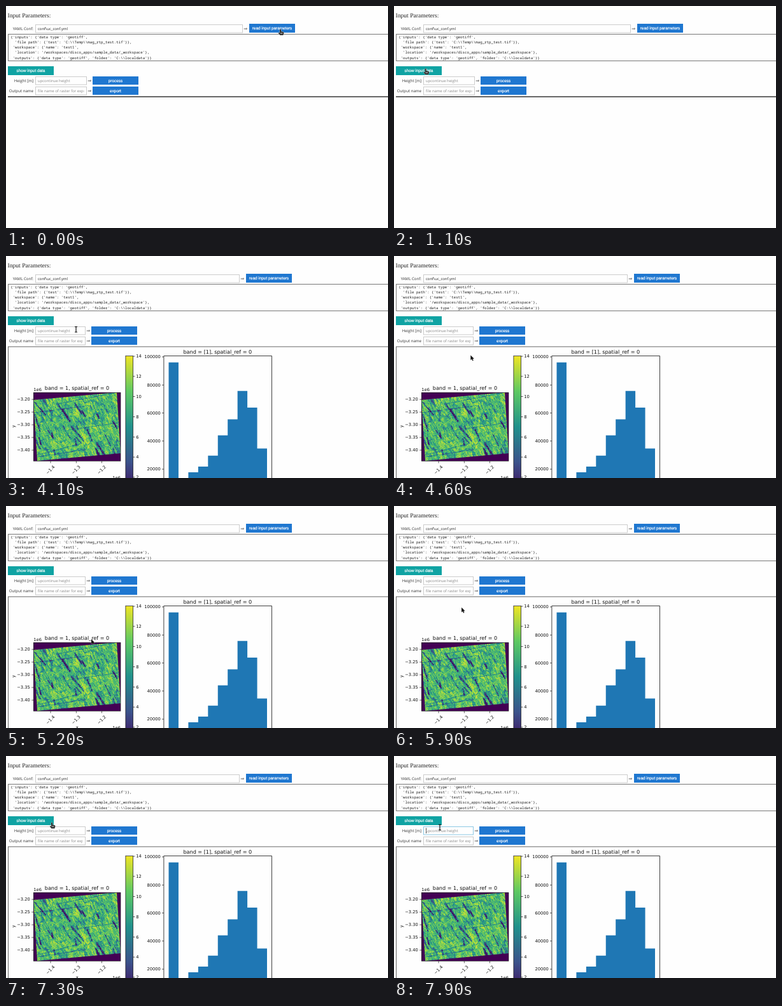
An HTML page with a canvas for the animation above (8000 ms loop, 600 by 350 pixels).

```html
<!DOCTYPE html>
<html lang="en">
<head>
<meta charset="utf-8">
<title>Input Parameters</title>
<style>
  html, body { margin: 0; width: 100%; height: 100%; overflow: hidden; background: #fefefe; }
  canvas { display: block; }
</style>
</head>
<body>
<canvas id="stage" width="600" height="350"></canvas>
<script>
const ctx = document.getElementById('stage').getContext('2d');
ctx.textRendering = 'geometricPrecision';

const LOOP = 8000, PLOT_AT = 3500, FOCUS_AT = 7500;
const BLUE = '#1f77d0', TEAL = '#10a3a3', INK = '#111';
const UI = '"Open Sans", sans-serif';
const PLOT = '"DejaVu Sans", sans-serif';
const TICK = 6.73, TITLE = 8.08;
const VIRIDIS = ['#440154', '#3b528b', '#21918c', '#5ec962', '#f0e524'];

const CONFIG = String.raw`{'inputs': {'data type': 'geotiff',
  'file path': {'test': 'C:\\Temp\\mag_rtp_test.tif'}},
 'workspace': {'name': 'test1',
  'location': '/workspaces/disco_apps/sample_data/_workspace'},
 'outputs': {'data type': 'geotiff', 'folder': 'C:\\localdata'}}`.split('\n');

// Stops of the pointer's hot spot
const POINTER = [
  { at: 0, x: 431, y: 37 },
  { at: 900, x: 50, y: 99 },
  { at: 2400, x: 45, y: 101 },
  { at: 2700, x: 162, y: 107 },
  { at: 3300, x: 189, y: 122 },
  { at: 4100, x: 110, y: 116 },
  { at: 5200, x: 134, y: 210 },
  { at: 6700, x: 72, y: 99 },
  { at: LOOP, x: 72, y: 113 }
];

const mix = (a, b, k) => a + (b - a) * k;
const clamp = (v, lo, hi) => Math.min(hi, Math.max(lo, v));
const ease = p => p * p * (3 - 2 * p);

function viridis(v) {
  const p = clamp(v, 0, 1) * 4, i = Math.min(3, Math.floor(p));
  const channel = (color, n) => parseInt(color.substr(1 + n * 2, 2), 16);
  return `rgb(${[0, 1, 2].map(n =>
    Math.round(mix(channel(VIRIDIS[i], n), channel(VIRIDIS[i + 1], n), p - i)))})`;
}

function rect(x, y, w, h, color) {
  ctx.fillStyle = color;
  ctx.fillRect(x, y, w, h);
}

function frame(x, y, w, h, color, width = 1) {
  ctx.strokeStyle = color;
  ctx.lineWidth = width;
  ctx.strokeRect(x, y, w, h);
}

function text(str, x, y, size, family, color = INK, align = 'left') {
  ctx.font = `${size}px ${family}`;
  ctx.fillStyle = color;
  ctx.textAlign = align;
  ctx.fillText(str, x, y);
}

const plotText = (str, x, y, align, size = TICK) => text(str, x, y, size, PLOT, INK, align);

function turnedText(str, x, y, angle) {
  ctx.save();
  ctx.translate(x, y);
  ctx.rotate(angle);
  plotText(str, 0, 2.4, 'center');
  ctx.restore();
}

// Evenly spaced axis ticks
function ticks(count, drawTick) {
  for (let i = 0; i < count; i++) drawTick(i);
}

// Seeded noise for the raster
function hash(x, y) {
  const s = Math.sin(x * 127.1 + y * 311.7) * 43758.5453;
  return s - Math.floor(s);
}

function noise(x, y) {
  const i = Math.floor(x), j = Math.floor(y), u = ease(x - i), v = ease(y - j);
  return mix(mix(hash(i, j), hash(i + 1, j), u), mix(hash(i, j + 1), hash(i + 1, j + 1), u), v);
}

function distanceTo(line, x, y) {
  const dx = x - line.x, dy = y - line.y;
  const c = Math.cos(line.angle), s = Math.sin(line.angle);
  const beyond = Math.max(0, Math.abs(dx * c + dy * s) - line.half);
  return Math.hypot(beyond, dy * c - dx * s);
}

// Steep dark faults, denser to the west, crossed by a few long shallow dykes
const FAULTS = Array.from({ length: 34 }, (_, i) => {
  const r = n => hash(i + 3, n * 7 + 1), dyke = i % 7 === 0;
  return {
    x: 137 * r(1) ** 1.4, y: 108 * r(2),
    angle: dyke ? -.12 - .15 * r(3) : .85 + .5 * r(3),
    half: dyke ? 60 : 3 + 11 * r(4),
    width: dyke ? .6 : .7 + 1.2 * r(5),
    depth: dyke ? .3 : .3 + .5 * r(6)
  };
});

function rasterValue(x, y) {
  const along = x * .45 + y * .9, across = x * .9 - y * .45;
  let v = .71 + .24 * (noise(across / 8, along / 15) - .5)
    + .32 * (noise(across / 1.7, along / 4) - .5) + .26 * (hash(x, y) - .5);
  if (Math.abs(noise(across / 6 + 40, along / 20) - .5) < .03) v -= .22;
  for (const fault of FAULTS) {
    const d = distanceTo(fault, x, y) / fault.width;
    if (d < 3) v -= fault.depth * Math.exp(-d * d) * (.5 + hash(y, x));
  }
  return clamp(v, .05, .92);
}

function buildRaster(w, h) {
  const map = document.createElement('canvas');
  map.width = w;
  map.height = h;
  const m = map.getContext('2d');
  m.fillStyle = viridis(0);
  m.fillRect(0, 0, w, h);
  m.clip(new Path2D(`M0 12L131 0L${w} 96L6 ${h}Z`));
  for (let y = 0; y < h; y++) {
    for (let x = 0; x < w; x++) {
      m.fillStyle = viridis(rasterValue(x, y));
      m.fillRect(x, y, 1, 1);
    }
  }
  return map;
}
const raster = buildRaster(137, 108);

// The form narrows a little once the plots are shown
function layout(plotted) {
  const top = plotted ? 377 : 382, low = plotted ? 134 : 136;
  return {
    buttons: [
      { label: 'read input parameters', x: top, y: 28, w: 72, h: 14, color: BLUE },
      { label: 'show input data', x: 3, y: 95, w: 72, h: 14, color: TEAL },
      { label: 'process', x: low, y: 111, w: 72, h: 13, color: BLUE },
      { label: 'export', x: low, y: 127, w: 72, h: 13, color: BLUE }
    ],
    fields: [
      { label: 'YAML Conf:', value: 'conf\\uc_conf.yml', color: '#222', x: 46, y: 29, w: top - 56, h: 13 },
      { label: 'Height [m]', value: 'upcontinue height', color: '#888', x: 46, y: 111, w: low - 55, h: 13 },
      { label: 'Output name', value: 'file name of raster for export', color: '#888', x: 46, y: 127, w: low - 55, h: 13 }
    ],
    config: { x: 3, y: 44, w: 620, h: 42 }
  };
}

function drawButton({ label, x, y, w, h, color }) {
  rect(x, y, w, h, color);
  const baseline = y + h / 2 + 2.2;
  text(label, x + w / 2, baseline, 6.4, '"Liberation Sans", sans-serif', '#fff', 'center');
  ctx.strokeStyle = '#fff';
  ctx.lineWidth = .2;
  ctx.strokeText(label, x + w / 2, baseline);
}

function drawField({ label, value, color, x, y, w, h }, focused) {
  text(label, x - 3, y + 9.1, 6.15, UI, '#333', 'right');
  frame(x + .5, y + .5, w - 1, h - .5, focused ? '#8cc8e4' : '#ccc');
  if (focused) rect(x + 4, y + 2.5, .8, 8.5, '#222');
  ctx.save();
  ctx.beginPath();
  ctx.rect(x, y, w - 4.5, h);
  ctx.clip();
  text(value, x + 4, y + 9, 5.95, UI, color);
  ctx.restore();
  text('⇒', x + w + 4.3, y + 9.3, 7, PLOT, '#444', 'center');
}

function drawForm({ buttons, fields, config }, focused) {
  text('Input Parameters:', 2.5, 18.4, 9.6, '"Liberation Serif", serif', '#222');
  frame(config.x + .5, config.y + .5, config.w, config.h, '#777');
  CONFIG.forEach((line, i) =>
    text(line, 7.2, 50.6 + i * 8.25, 5.77, '"Noto Sans Mono", monospace', '#222'));
  fields.forEach((field, i) => drawField(field, focused && i === 1));
  buttons.forEach(drawButton);
}

function drawRasterPlot() {
  plotText('band = 1, spatial_ref = 0', 111.5, 211.3, 'center', TITLE);
  plotText('1e6', 43.3, 213.4, 'left');
  ctx.drawImage(raster, 43, 215);
  frame(43.5, 215.5, 136.5, 108, INK, .6);
  ticks(5, i => {
    const y = 226 + i * 20;
    rect(40.3, y - .3, 3, .7, INK);
    plotText('−' + (3.2 + i * .05).toFixed(2), 37.8, y + 2.4, 'right');
  });
  ticks(3, i => {
    const x = 70 + i * 40.2;
    rect(x - .3, 323.5, .7, 3, INK);
    turnedText('−' + (1.4 - i * .1).toFixed(1), x - .4, 337, -Math.PI / 4);
  });
  turnedText('y', 11.5, 268.5, -Math.PI / 2);
  plotText('x', 111.8, 351.2, 'center');
  plotText('1e6', 180, 352.3, 'right');
}

function drawColorbar() {
  const scale = ctx.createLinearGradient(0, 380.5, 0, 157.5);
  VIRIDIS.forEach((color, i) => scale.addColorStop(i / 4, color));
  rect(188, 158, 11.5, 200, scale);
  frame(187.9, 157.6, 11.6, 200, INK, .7);
  ticks(7, i => {
    const y = 158 + i * 31.8;
    rect(199.5, y - .3, 3, .7, INK);
    plotText(14 - i * 2, 204.3, y + 2.4, 'left');
  });
}

function drawHistogram() {
  const zero = 380, perThousand = 2.21;
  plotText('band = [1], spatial_ref = 0', 332.3, 154, 'center', TITLE);
  ctx.fillStyle = '#1f77b4';
  ctx.beginPath();
  [96, 9, 17.6, 21.7, 29.5, 44, 55.4, 75.7, 63.8, 34.6].forEach((count, i) =>
    ctx.rect(255.5 + i * 15.45, zero, 15.45, -count * perThousand));
  ctx.fill();
  frame(247.9, 157.6, 169.7, 222, INK, .8);
  ticks(5, i => {
    const y = 159 + i * 44.25;
    rect(245, y - .3, 3, .7, INK);
    plotText(100000 - i * 20000, 242.8, y + 2.4, 'right');
  });
}

function pointerAt(t) {
  const i = POINTER.findIndex(stop => stop.at > t);
  const from = POINTER[i - 1], to = POINTER[i];
  const k = ease((t - from.at) / (to.at - from.at));
  return { x: mix(from.x, to.x, k), y: mix(from.y, to.y, k) };
}

function pointerKind({ x, y }, { buttons, fields, config }) {
  const over = r => x >= r.x && x <= r.x + r.w && y >= r.y && y <= r.y + r.h;
  if (buttons.some(over)) return 'hand';
  return [...fields, config].some(over) ? 'beam' : 'arrow';
}

const SHAPES = {
  arrow: new Path2D('M0 0V7.4L1.8 5.9L3 8.6L4.3 8L3.1 5.4H5.4Z'),
  hand: new Path2D('M-1 0Q0-1 1 0V3L4.6 4Q5.6 4.4 5.3 6L4.4 9H-.6L-3 6Q-3.4 4.8-2 5L-1 5.6Z'),
  beam: new Path2D('M-2-4.5H2M0-4.5V4M-2 4H2')
};

function drawPointer(t, form) {
  const spot = pointerAt(t), kind = pointerKind(spot, form), beam = kind === 'beam';
  ctx.save();
  ctx.translate(spot.x, spot.y);
  ctx.lineWidth = beam ? 1.2 : .6;
  ctx.strokeStyle = beam ? INK : '#ddd';
  ctx.stroke(SHAPES[kind]);
  if (!beam) {
    ctx.fillStyle = kind === 'hand' ? '#333' : INK;
    ctx.fill(SHAPES[kind]);
  }
  if (kind === 'hand') rect(-.2, 5.2, 3.6, 1.6, '#999');
  ctx.restore();
}

function draw(now) {
  // The screen refreshes ten times a second
  const t = Math.floor((now % LOOP) / 100) * 100;
  const plotted = t >= PLOT_AT, form = layout(plotted);
  rect(0, 0, 600, 350, '#fefefe');
  drawForm(form, t >= FOCUS_AT);
  if (plotted) {
    frame(3.5, 143, 620, 300, '#666');
    drawRasterPlot();
    drawColorbar();
    drawHistogram();
  } else {
    rect(3, 142.2, 597, 1.8, '#555');
  }
  drawPointer(t, form);
}

const start = performance.now();
function tick() {
  draw(performance.now() - start);
  requestAnimationFrame(tick);
}
tick();
</script>
</body>
</html>
```
